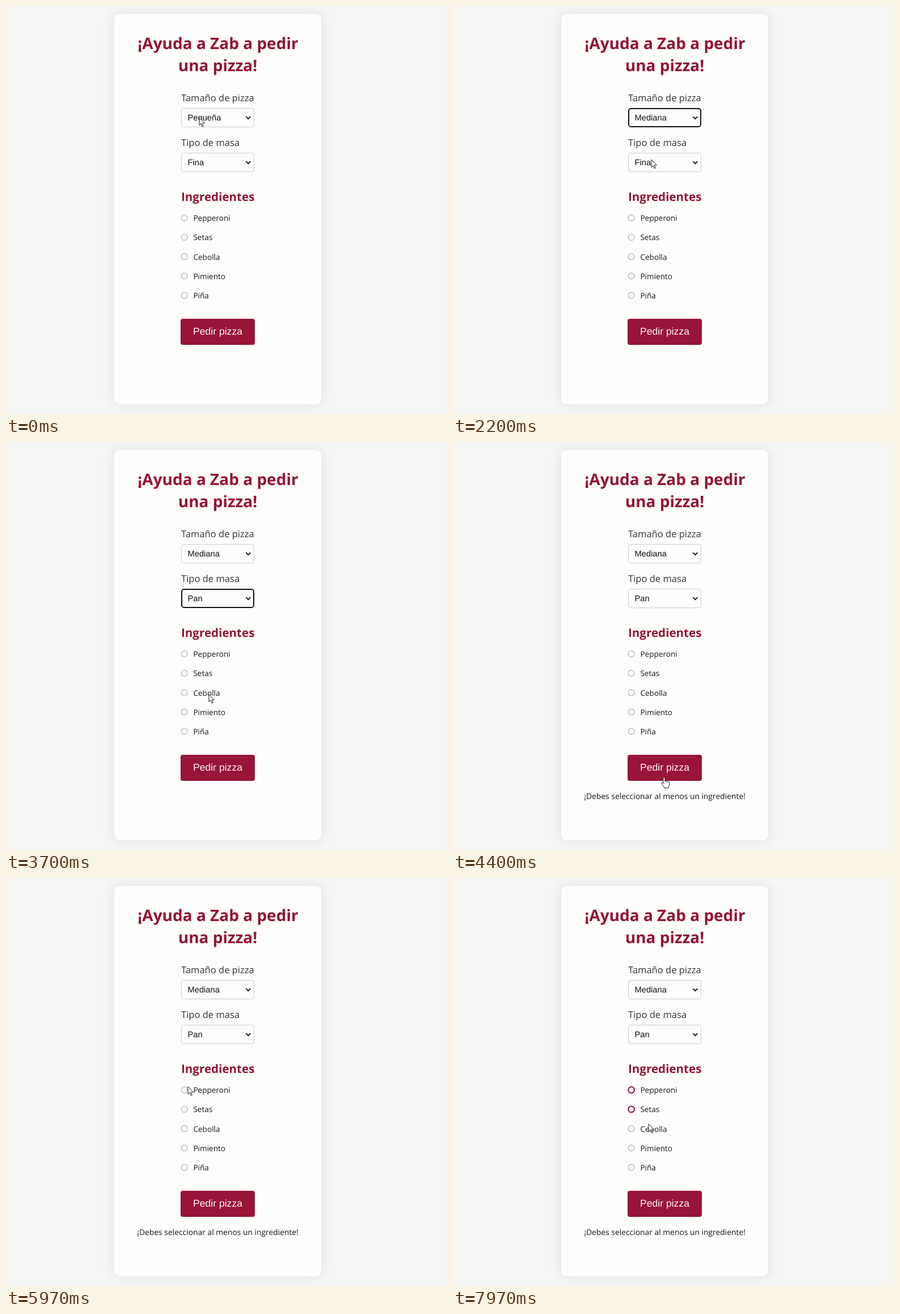
Animation of 778x720 px, one loop 8 s. Source, as an HTML page:

```html
<!DOCTYPE html>
<html lang="es">
<head>
<meta charset="utf-8">
<title>Pedir pizza</title>
<style>
  html, body { margin: 0; width: 100%; height: 100%; overflow: hidden; background: #f6f7f4; }
  svg { display: block; width: 778px; height: 720px; }
  text { font-family: "Open Sans", "Noto Sans", sans-serif; fill: #161616; text-rendering: geometricPrecision; }
  .card { fill: #fdfdfc; filter: drop-shadow(0 0 10px rgba(20, 10, 60, .1)); }
  .title { font-size: 28px; font-weight: 700; fill: #941436; text-anchor: middle; }
  .heading { font-size: 20.6px; font-weight: 700; fill: #941436; }
  .label { font-size: 16.55px; fill: #333; }
  .item { font-size: 13.6px; }
  .message { font-size: 13.85px; text-anchor: middle; }
  .control { font-family: "Liberation Sans", Arial, sans-serif; font-size: 14.7px; fill: #111; }
  .button-text { font-family: "Liberation Sans", Arial, sans-serif; font-size: 17.6px; fill: #fdf6f3; text-anchor: middle; }
  .button { fill: #981438; }
  .box { fill: #fdfdfc; stroke: #ccc; transform-box: fill-box; transform-origin: center; }
  /* The thicker focus ring keeps the outer edge of the box. */
  .box.focus { stroke: #111; stroke-width: 2; transform: scale(.992, .97); }
  .chevron { fill: none; stroke: #111; stroke-width: 1.9; }
  .radio { fill: #fdfdfc; stroke: #bcbcbc; stroke-width: 1.5; }
  .radio.checked { stroke: #8c1a3c; stroke-width: 2; }
  .popup-box { fill: #fdfdfc; stroke: #aaa; filter: drop-shadow(0 12px 22px rgba(0, 0, 0, .36)); }
  .highlight { fill: #2191f0; }
  .pointer { fill: #fff; stroke: #1c1c24; stroke-width: 1; stroke-linejoin: round; }
</style>
</head>
<body>
<svg id="stage" viewBox="0 0 778 720"></svg>
<script>
const LOOP = 8000;
const stage = document.getElementById('stage');

function add(tag, attrs, parent = stage) {
  const node = document.createElementNS('http://www.w3.org/2000/svg', tag);
  for (const key in attrs) node.setAttribute(key, attrs[key]);
  parent.appendChild(node);
  return node;
}

function write(cls, x, y, content, parent) {
  const node = add('text', { class: cls, x, y }, parent);
  node.textContent = content;
  return node;
}

const show = (node, visible) => node.setAttribute('visibility', visible ? 'visible' : 'hidden');

add('rect', { class: 'card', x: 191, y: 14, width: 365, height: 689, rx: 10 });
write('title', 374, 76, '¡Ayuda a Zab a pedir');
write('title', 373.5, 115, 'una pizza!');

function makeSelect(label, top, options) {
  write('label', 309, top - 12.3, label);
  const box = add('rect', { class: 'box', x: 309.5, y: top + .5, width: 128, height: 33, rx: 4 });
  const value = write('control', 320.5, top + 21.6, options[0]);
  add('path', { class: 'chevron', d: `M423.4 ${top + 15.2}l4 4 4-4` });
  return { box, value, top, options };
}

// Popups are built last so that they cover the form.
function addPopup(select) {
  const top = select.top + 33;
  const outline = `M310.5 ${top + .5}h127v50q0 6-6 6h-115q-6 0-6-6z`;
  const group = add('g', {});
  add('path', { class: 'popup-box', d: outline }, group);
  const clip = add('clipPath', { id: 'clip' + top }, group);
  add('path', { d: outline }, clip);
  select.highlight = add('rect', {
    class: 'highlight', x: 310, width: 128, height: 18.6, 'clip-path': `url(#clip${top})`
  }, group);
  select.rows = select.options.map((name, i) => write('control', 321.5, top + 15 + i * 18.2, name, group));
  select.popup = group;
}

const size = makeSelect('Tamaño de pizza', 180, ['Pequeña', 'Mediana', 'Grande']);
const dough = makeSelect('Tipo de masa', 259, ['Fina', 'Gruesa', 'Pan']);
Object.assign(size, { open: 850, close: 1720, blur: 2450, choice: 1 });
Object.assign(dough, { open: 2450, close: 3400, blur: 4260, choice: 2 });

write('heading', 309, 343.5, 'Ingredientes');
const radios = ['Pepperoni', 'Setas', 'Cebolla', 'Pimiento', 'Piña'].map((name, i) => {
  const y = 374 + i * 34.15;
  write('item', 330.4, y + 5.2, name);
  return add('circle', { class: 'radio', cx: 314.6, cy: y, r: 5.4 });
});
const checkTimes = [6250, 7150];

add('rect', { class: 'button', x: 308, y: 552, width: 131, height: 46, rx: 4 });
write('button-text', 373.5, 580, 'Pedir pizza');
const message = write('message', 373.6, 630, '¡Debes seleccionar al menos un ingrediente!');

[size, dough].forEach(addPopup);

const arrow = add('path', {
  class: 'pointer', d: 'M0 0V13.5L3.1 10.6 5.3 15.8 7.3 15 5.1 9.9H9.4Z'
});
const hand = add('path', {
  class: 'pointer',
  d: 'M-2 11V1.5a1.5 1.5 0 0 1 3 0V7c1-1.2 2.6-.7 2.8.4 1-.8 2.4-.3 2.6.7 1-.5 2.2 0 2.2 1.4V13' +
     'c0 2-1.2 3-1.4 5.5H-.2C-.8 15.5-4 13-5 10.5c-.7-1.8 1-2.6 3-.3'
});

// Pointer stops: time, x, y
const path = [
  [0, 341, 197], [1150, 341, 197], [1500, 346, 237], [1750, 346, 237],
  [2150, 350, 271], [2450, 350, 271], [2850, 347, 339], [3420, 347, 339],
  [4050, 373, 592], [4700, 373, 592], [5700, 321, 368], [6300, 321, 368],
  [6800, 321, 403], [7400, 321, 403], [7950, 345, 434], [LOOP, 345, 434]
];

function pointerAt(t) {
  const i = path.findIndex(stop => stop[0] > t);
  const [t0, x0, y0] = path[i - 1], [t1, x1, y1] = path[i];
  const k = (t - t0) / (t1 - t0);
  const eased = k * k * (3 - 2 * k);
  return [x0 + (x1 - x0) * eased, y0 + (y1 - y0) * eased];
}

function drawSelect(select, t, y) {
  const { open, close, blur, options, choice, top } = select;
  show(select.popup, t >= open && t < close);
  select.value.textContent = options[t >= close ? choice : 0];
  select.box.classList.toggle('focus', t >= close && t < blur);
  const row = Math.max(0, Math.min(2, Math.floor((y - top - 34) / 18.2)));
  select.highlight.setAttribute('y', top + 34 + row * 18.2);
  select.rows.forEach((node, i) => node.style.fill = i === row ? '#fff' : '');
}

function draw(t) {
  const [x, y] = pointerAt(t);
  drawSelect(size, t, y);
  drawSelect(dough, t, y);
  checkTimes.forEach((time, i) => radios[i].classList.toggle('checked', t >= time));
  show(message, t >= 4260);

  const onButton = y >= 552 && y <= 598;
  show(arrow, !onButton);
  show(hand, onButton);
  for (const node of [arrow, hand]) node.setAttribute('transform', `translate(${x} ${y})`);
}

const start = performance.now();
function frame() {
  draw((performance.now() - start) % LOOP);
  requestAnimationFrame(frame);
}
frame();
</script>
</body>
</html>
```
